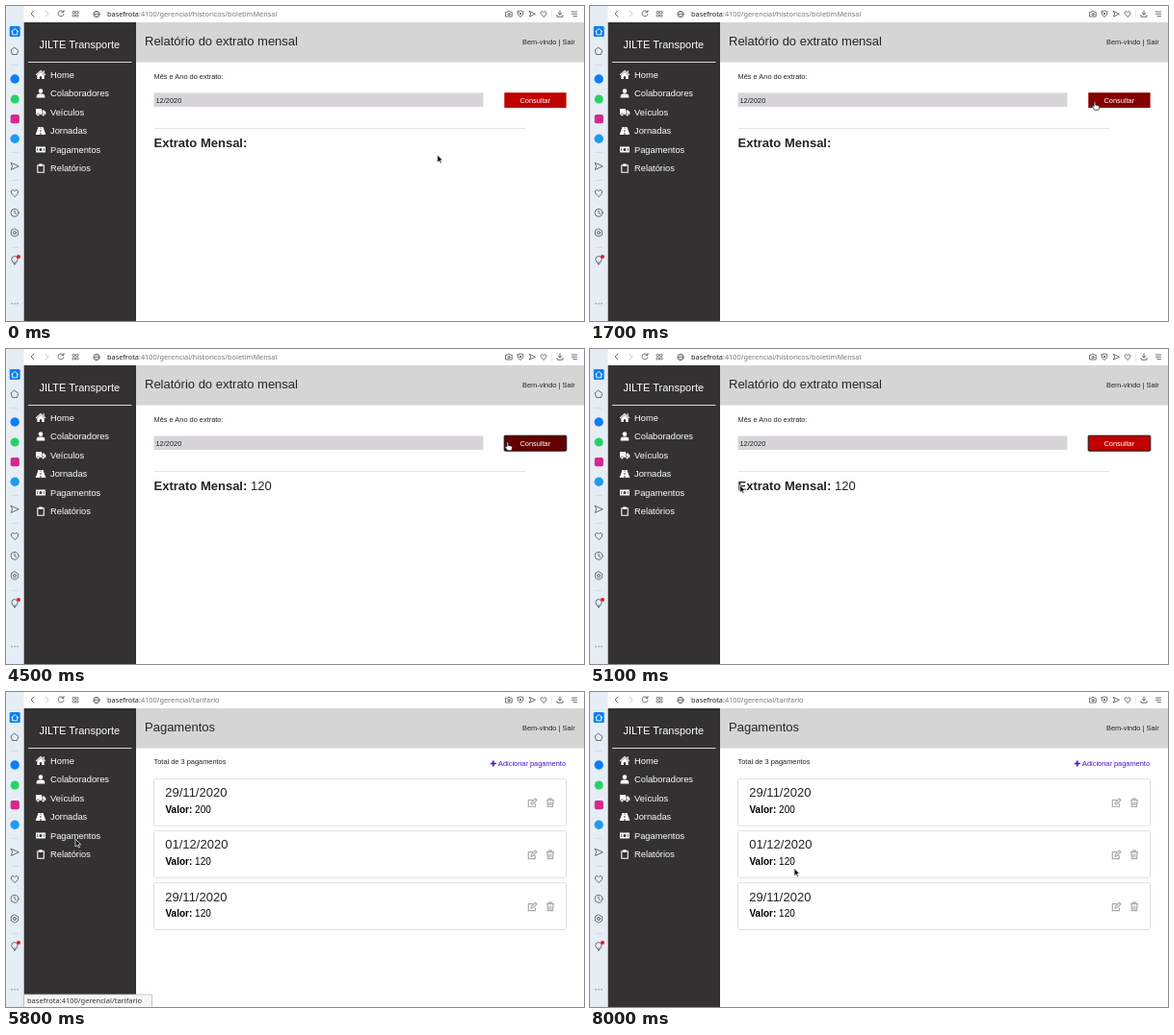
These frames come from a looping animation (600x328 px, 8100 ms). An HTML page:

```html
<!DOCTYPE html>
<html lang="pt">
<head>
<meta charset="utf-8">
<title>Extrato mensal</title>
<style>
html, body { margin: 0; width: 100%; height: 100%; overflow: hidden; background: #fefefe; }
svg { display: block; }
text { font: 7.42px "Liberation Sans", Arial, sans-serif; fill: #212529; white-space: pre; }
.url { font: 7.35px "Noto Sans", sans-serif; fill: #777; }
.url tspan { fill: #222; }
.status { font: 7.5px "Noto Sans", sans-serif; fill: #333; }
.big { font-size: 13px; }
.mid { font-size: 10px; fill: #000; }
.menu text { font-size: 9.3px; fill: #fff; }
.menu .brand { font-size: 11px; }
.menu .sub { font-size: 7.42px; }
.bold { font-weight: bold; }
.line { fill: none; stroke: #59616a; stroke-width: .9; stroke-linecap: round; stroke-linejoin: round; }
.white { fill: #fff; }
.grey { fill: none; stroke: #aaa; stroke-width: 1.2; }
</style>
</head>
<body>
<svg width="600" height="328" viewBox="0 0 600 328">
  <rect width="600" height="328" fill="#fefefe"/>
  <rect x="135" y="17" width="465" height="41.5" fill="#d6d5d6"/>

  <!-- browser toolbar -->
  <g class="line">
    <path d="M29 5l-3 3 3 3M59.5 6a3 3 0 1 0 .5 2.5M60 4.5v2h-2"/>
    <path d="M41 5l3 3-3 3" stroke="#ccc"/>
    <path d="M69.5 5.5h2v2h-2zM73 5.5h2v2h-2zM69.5 9h2v2h-2zM73 9h2v2h-2z" stroke-width=".7"/>
    <circle cx="94" cy="8.5" r="3.2"/>
    <path d="M91 8.5h6M94 5.3q-3 3.2 0 6.4q3-3.2 0-6.4" stroke-width=".6"/>
    <path d="M519 6.3h1.5l.7-1h1.8l.7 1h1.5v4.7h-6.2z"/><circle cx="522.1" cy="8.6" r="1.1"/>
    <path d="M531 5.8l3-1 3 1q.3 4-3 5.7q-3.300-1.700-3-5.700M533 7l2 2m0-2l-2 2"/>
    <path d="M543.500 5.500l6 2.800-6 2.800 1-2.800z"/>
    <path d="M558 11.300l-2.800-2.900q-.8-2 .9-2.700q1.300-.2 1.900 1q.6-1.200 1.900-1q1.700.7.9 2.700z"/>
    <path d="M575 5v4m-1.700-1.700l1.700 1.700 1.700-1.700M572 9.500v1.700h6v-1.700M587.500 6h5M587.500 8.300h5M589 10.600h3.500"/>
    <path d="M566.500 4.500v7.500" stroke="#ddd" stroke-width=".6"/>
  </g>
  <text class="url" x="105" y="10.800"><tspan>basefrota</tspan>:4100/gerencial/<tspan id="path" style="fill:inherit"></tspan></text>

  <!-- browser side strip -->
  <rect width="18.500" height="328" fill="#e6edf5"/>
  <path d="M5 61.500h8M5 152.500h8M5 181.500h8M5 251.500h8" stroke="#cfd6df" stroke-width=".7"/>
  <rect x="3.700" y="21" width="11" height="11" rx="1.500" fill="#0a7ff5"/>
  <path class="line" style="stroke:#fff" d="M5.800 26.500l3.400-3 3.400 3M6.700 26v3.800h5v-3.800"/>
  <g class="line">
    <path d="M9 43.300l3.800 3-1.300 4.200h-5l-1.300-4.200z"/>
    <path d="M5.300 163.300l8 3.500-8 3.700 1.200-3.700z"/>
    <path d="M9 198.500l-3.500-3.600q-1-2.400 1-3.400q1.800-.3 2.500 1.300q.7-1.600 2.500-1.300q2 1 1 3.400z"/>
    <circle cx="9" cy="215.300" r="4"/><path d="M9 213v2.500l1.500 1"/>
    <path d="M9 232l3.600 2v4.200l-3.600 2-3.600-2v-4.200z"/><circle cx="9" cy="236.100" r="1.500"/>
    <path d="M9 269.200q-3.400-3.600-3.200-5.400a3.200 3.200 0 0 1 6.400 0q.2 1.800-3.200 5.400M8 267h2"/>
    <path d="M6 309.800h.1M9 309.800h.1M12 309.800h.1" stroke-width="1.300"/>
  </g>
  <circle cx="13" cy="261" r="2" fill="#f3142d"/>
  <circle cx="9.200" cy="76" r="4.700" fill="#0a7cff"/>
  <circle cx="9.200" cy="97" r="4.500" fill="#25d366"/>
  <rect x="4.700" y="113" width="9.200" height="9.200" rx="2" fill="#d52890"/>
  <circle cx="9.200" cy="138.300" r="4.700" fill="#1d9bf0"/>

  <!-- page menu -->
  <g class="menu">
    <rect x="18.700" y="17" width="116.300" height="311" fill="#333132"/>
    <text class="brand" x="34.500" y="44.300">JILTE Transporte</text>
    <path d="M23 58.500h107.500" stroke="#d8d8d8"/>
    <g id="items"></g>
    <g class="white">
      <path d="M36 66.800l5.300 4.700-.7.700-4.600-4-4.600 4-.7-.7zM32.300 72l3.700-3.200 3.700 3.200v4h-2.600v-2.700h-2.200v2.700h-2.600zM38.600 67.300h1.200v2.500l-1.200-1z"/>
      <circle cx="36" cy="88.600" r="2.300"/>
      <path d="M31.700 95.500v-1.200q0-2.700 2.800-2.700h3q2.800 0 2.800 2.700v1.200z"/>
      <path d="M31 107h6v6h-6zM37.500 108.500h2l1.800 2v2.500h-3.800z"/>
      <circle cx="33.300" cy="113.300" r="1.400" stroke="#333132" stroke-width=".6"/>
      <circle cx="38.700" cy="113.300" r="1.400" stroke="#333132" stroke-width=".6"/>
      <path d="M33.500 126h5l2.800 8h-10.600z"/>
      <path d="M36 126.500v1.200M36 129v1.800M36 132v2" stroke="#333132"/>
      <rect x="31" y="146.500" width="10" height="6"/>
      <circle cx="36" cy="149.500" r="1.500" fill="#333132"/>
      <path d="M32.500 148v3M39.500 148v3" stroke="#333132" stroke-width=".7"/>
      <path d="M32.800 165.800h6.500v7.400h-6.500z" fill="none" stroke="#fff" stroke-width="1.100"/>
      <path d="M34.300 164.300h3.400v2.600h-3.400z"/>
    </g>
    <g id="submenu">
      <text class="sub" x="48" y="189.200">Extrato diário</text>
      <text class="sub" x="48" y="205.800">Extrato mensal</text>
      <text class="sub" x="48" y="222.400">Jornadas não cumpridas</text>
    </g>
  </g>

  <text class="big" id="heading" x="144" y="41"></text>
  <text x="536" y="40.300">Bem-vindo | Sair</text>

  <g id="report">
    <text x="153.500" y="76">Mês e Ano do extrato:</text>
    <rect x="153.500" y="90.500" width="342" height="14.500" fill="#d7d5d7"/>
    <text x="155.500" y="100.500">12/2020</text>
    <rect id="button" x="517.300" y="90.200" width="64.300" height="15.800"/>
    <rect id="focus" x="517.200" y="90.200" width="64.600" height="16" rx="1" fill="none" stroke="#111"/>
    <text class="white" style="fill:#fff" x="549.300" y="100.700" text-anchor="middle">Consultar</text>
    <path d="M153.500 127.500h386" stroke="#e5e5e5"/>
    <text class="big" x="153.500" y="147.400"><tspan class="bold">Extrato Mensal:</tspan><tspan id="total"> 120</tspan></text>
  </g>

  <g id="payments">
    <text x="153.500" y="75">Total de 3 pagamentos</text>
    <path d="M502.800 74.500h6M505.800 71.500v6" stroke="#4d12cc" stroke-width="1.700"/>
    <text x="511" y="77" style="fill:#4d12cc">Adicionar pagamento</text>
    <g id="cards"></g>
  </g>

  <g id="status">
    <rect id="statusBox" x="18.500" y="315" height="14" fill="#f6f6f6" stroke="#bbb" stroke-width=".8"/>
    <text class="status" id="statusText" x="22" y="324.200"></text>
  </g>

  <g id="cursor" stroke="#fff" stroke-width=".7" stroke-linejoin="round">
    <path id="arrow" fill="#111" d="M0 0v8l1.900-1.600 1.300 2.700 1.300-.6-1.300-2.700h2.500z"/>
    <path id="hand" fill="#fff" stroke="#111" d="M-.8.500q.8-1 1.600 0v3l3.200.7q1 .3.800 1.500l-.8 3h-4.200l-2.600-3.500q0-1.200 1.200-.8l.8.700z"/>
  </g>
</svg>
<script>
const $ = id => document.getElementById(id);
const show = (id, on) => $(id).style.display = on ? "" : "none";

$("items").innerHTML = ["Home", "Colaboradores", "Veículos", "Jornadas", "Pagamentos", "Relatórios"]
  .map((name, i) => `<text x="46" y="${74.8 + 19.45 * i}">${name}</text>`).join("");

$("cards").innerHTML = [["29/11/2020", 200], ["01/12/2020", 120], ["29/11/2020", 120]]
  .map(([date, value], i) => `<g transform="translate(0 ${54.1 * i})">
    <rect x="153.500" y="90.500" width="428" height="48.800" rx="1" fill="#fff" stroke="#e1e1e1"/>
    <text class="big" x="165.300" y="109.400">${date}</text>
    <text class="mid" x="165.500" y="125.800"><tspan class="bold">Valor:</tspan> ${value}</text>
    <path class="grey" d="M547 112.500h-4.700v7h7v-3.500M545 117l.4-1.900 4-4 1.500 1.500-4 4z"/>
    <path class="grey" d="M561 112.500h8M563.500 112v-1h3v1M562 113l.4 6.500h5.200l.4-6.500M564 114.500v4M566 114.500v4"/>
  </g>`).join("");

// cursor hot spot: time, x, y
const path = [
  [0, 447.8, 155], [100, 447.8, 155], [1000, 526, 105], [1700, 524, 99.5], [2000, 520.8, 97],
  [4500, 520.8, 97], [5300, 88, 150], [5600, 71, 151.5], [5800, 72, 153],
  [6100, 100, 172], [6300, 118, 181], [6700, 165, 186], [7200, 212, 183.5], [8100, 212, 183.5]
];

function cursorAt(t) {
  const i = path.findIndex(p => p[0] > t);
  const [t0, x0, y0] = path[i - 1], [t1, x1, y1] = path[i];
  const u = (t - t0) / (t1 - t0), k = u * u * (3 - 2 * u);
  return [x0 + (x1 - x0) * k, y0 + (y1 - y0) * k];
}

function draw(t) {
  const within = (a, b) => t >= a && t < b;
  const paid = t >= 5800;
  const [x, y] = cursorAt(t);
  const onButton = !paid && x > 517 && y > 90 && y < 106;
  const hand = onButton || within(5900, 6500);

  $("cursor").setAttribute("transform", `translate(${x} ${y})`);
  show("hand", hand);
  show("arrow", !hand);

  show("report", !paid);
  show("payments", paid);
  $("heading").textContent = paid ? "Pagamentos" : "Relatório do extrato mensal";
  $("path").textContent = paid ? "tarifario" : "historicos/boletimMensal";

  $("button").setAttribute("fill", !onButton ? "#c20000" : t < 1800 ? "#850000" : "#650000");
  show("focus", within(1800, 5500));
  show("total", t >= 1900);
  show("submenu", within(6000, 6500));

  const daily = t >= 6200;
  show("status", within(5200, 6500));
  $("status").style.opacity = within(6300, 6500) ? .75 : 1;
  $("statusBox").setAttribute("width", daily ? 173.5 : 133);
  $("statusText").textContent = "basefrota:4100/gerencial/" + (daily ? "historicos/boletimDiario" : "tarifario");
}

const start = performance.now();
function tick() {
  const t = (performance.now() - start) % 8100;
  draw(Math.floor(t / 100) * 100);
  requestAnimationFrame(tick);
}
tick();
</script>
</body>
</html>
```
